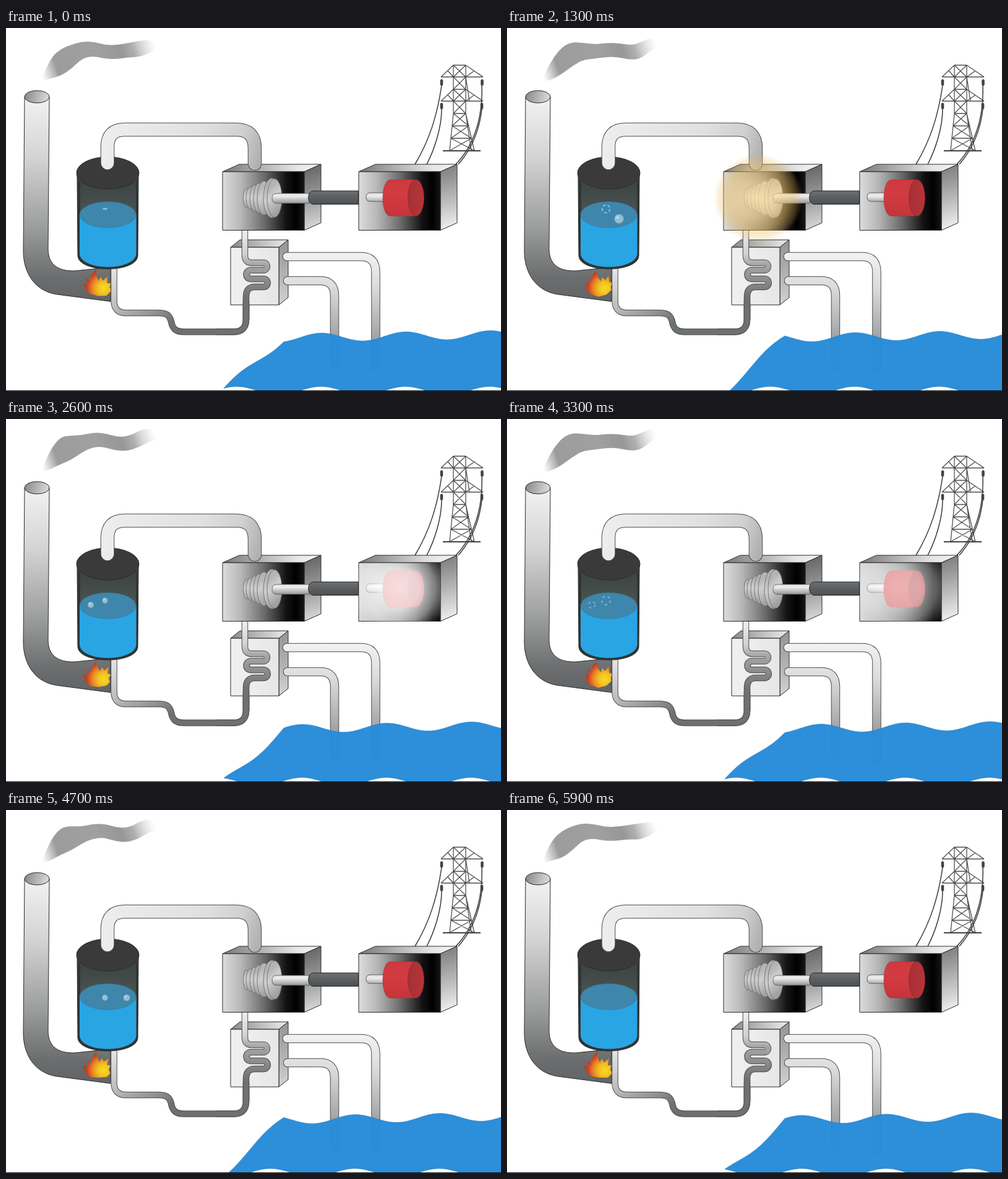
Recreate the animation shown at these times as an HTML page. Size 800x586 px, loop 6 s.

```html
<!DOCTYPE html>
<html lang="en">
<head>
<meta charset="utf-8">
<title>Steam power plant</title>
<style>
html, body { margin: 0; width: 100%; height: 100%; overflow: hidden; background: #fff; }
svg { display: block; width: 800px; height: 586px; }
.edge { stroke: #2b2b2b; stroke-width: 1; stroke-linejoin: round; }
.wire { fill: none; stroke: #3a3a3a; stroke-width: 1.5; }
</style>
</head>
<body>
<svg id="stage" viewBox="0 0 800 586">
  <defs id="defs"></defs>
  <path id="smoke" fill="url(#smokeG)"/>

  <g id="chimney" class="edge">
    <path fill="url(#chimneyG)" d="M30 111 L28 360 C28 397 48 425 82 430 L169 441.500 V386 L112 392 C84 393 68 382 68 356 L70 111 Z"/>
    <ellipse cx="50" cy="111" rx="20" ry="10" fill="url(#rimG)"/>
  </g>
  <path id="flame" fill="url(#flameG)"/>

  <g id="pylon" class="wire"></g>
  <g class="wire">
    <path d="M704 93 C697 140 685 180 661 220"/>
    <path d="M704 131 C704 160 693 195 680 220"/>
    <path d="M769 93 C771 145 756 190 727 220"/>
    <path d="M769 131 C765 165 752 196 731 220"/>
  </g>
  <g fill="#444" stroke="#333" stroke-width=".5">
    <rect x="702" y="83" width="4" height="10" rx="2"/>
    <rect x="767.500" y="83" width="4" height="10" rx="2"/>
    <rect x="702" y="121" width="4" height="10" rx="2"/>
    <rect x="767" y="121" width="4" height="10" rx="2"/>
  </g>

  <g id="feed"></g>

  <g id="boiler">
    <path class="edge" fill="#303534" d="M115 236 L116 368 C118 396 211 396 213 368 L214 236 Z"/>
    <path fill="url(#tankG)" d="M120 240 V303 H210 V240 Z"/>
    <path fill="#29a5e4" d="M119 301 V364 C120 393 209 393 210.500 364 V301 Z"/>
    <ellipse cx="164.500" cy="301.500" rx="45.500" ry="21" fill="#3e86ac" stroke="#397a9c" stroke-width=".7"/>
    <ellipse class="edge" cx="164.500" cy="234" rx="50.500" ry="26" fill="#3a3a3b"/>
    <path fill="#3a3a3b" d="M114.500 234 L116 250 Q120 248 122 244 M214.500 234 L213 250 Q209 248 207 244"/>
  </g>
  <g id="bubbles"></g>

  <g id="boxes" class="edge"></g>
  <g id="pipes"></g>

  <g id="turbine"></g>
  <path fill="url(#rodG)" stroke="#555" stroke-width=".8" d="M490 267 H437 Q430 267 430 275 Q430 283 437 283 H490 Z"/>
  <path fill="url(#darkRodG)" stroke="#222" d="M569.500 263 H497 C486 263 486 284.500 497 284.500 H569.500 Z"/>

  <path fill="url(#rodG)" stroke="#444" stroke-width=".8" d="M613 266 H589 Q582 266 582 273 Q582 280 589 280 H613 Z"/>
  <path fill="url(#redG)" stroke="#a92e33" stroke-width=".6" d="M621 245 H663 V303.500 H621 C605 303 605 246 621 245 Z"/>
  <ellipse cx="662.500" cy="274.200" rx="13" ry="29.300" fill="url(#redEndG)" stroke="#8e292e" stroke-width=".7"/>

  <circle id="warm" cx="406" cy="275" r="72" fill="url(#warmG)"/>
  <path id="white" fill="url(#whiteG)" d="M570 232.500 H702 V326.500 H570 Z"/>

  <path id="lake" fill="#288cd9" fill-opacity=".975" stroke="#2b80c0" stroke-width=".6"/>
  <rect y="585" width="800" height="1" fill="#111"/>
</svg>
<script>
const NS = 'http://www.w3.org/2000/svg';
const $ = id => document.getElementById(id);

function add(parent, tag, attrs) {
  const el = document.createElementNS(NS, tag);
  for (const k in attrs) el.setAttribute(k, attrs[k]);
  parent.appendChild(el);
  return el;
}

// Each stop reads "offset colour [opacity]".
function gradient(id, pos, stops) {
  const radial = pos.length === 3;
  const keys = radial ? ['cx', 'cy', 'r'] : ['x1', 'y1', 'x2', 'y2'];
  const attrs = { id, gradientUnits: 'userSpaceOnUse' };
  keys.forEach((k, i) => attrs[k] = pos[i]);
  const g = add($('defs'), radial ? 'radialGradient' : 'linearGradient', attrs);
  for (const s of stops.split(',')) {
    const [offset, color, opacity = 1] = s.trim().split(' ');
    add(g, 'stop', { offset, 'stop-color': color, 'stop-opacity': opacity });
  }
}

gradient('smokeG', [60, 84, 243, 24], '0 #aaa 0, .14 #9c9c9c, .5 #a0a0a0, .7 #979797, .8 #a0a0a0 .85, .9 #bbb .42, 1 #ddd 0');
gradient('chimneyG', [0, 111, 0, 435], '0 #f2f2f2, .3 #d4d4d4, .65 #9c9d9d, .9 #6b6d6e, 1 #636566');
gradient('rimG', [32, 106, 68, 116], '0 #8c8c8c, .5 #b4b4b4, 1 #dcdcdc');
gradient('flameG', [158, 420, 33], '0 #f6dc24, .3 #f2c022, .55 #ea8a24, .8 #cf4424, 1 #b3301f');
gradient('tankG', [0, 245, 0, 303], '0 #3c4342, 1 #4b5553');
gradient('rodG', [0, 266, 0, 284], '0 #ddd, .3 #eee, 1 #8c8c8c');
gradient('darkRodG', [0, 263, 0, 284], '0 #6c7072, .5 #5b5f61, 1 #4d5153');
gradient('redG', [0, 245, 0, 303], '0 #cf393f, .4 #d23c41, 1 #c6343a');
gradient('redEndG', [650, 0, 676, 0], '0 #a53036, 1 #b8343a');
gradient('steamG', [164, 160, 405, 228], '0 #ededed, .6 #e0e0e0, .85 #d0d0d0, 1 #b0b0b0');
gradient('coolG', [0, 362, 0, 500], '0 #f2f2f2, .4 #dcdcdc, 1 #a2a3a4');
gradient('feedG', [174, 390, 250, 490], '0 #e4e4e4, .4 #bcbcbc, .75 #929394, 1 #6c7071');
gradient('coilG', [0, 327, 0, 435], '0 #eee, .35 #d0d0d0, .5 #a8a8a8, .75 #8b8b8b, 1 #6e7173');
gradient('warmG', [406, 275, 72], '0 #ffe4a4 .75, .4 #fcdb94 .62, .7 #f5c568 .45, .88 #efb95a .25, 1 #efb95a 0');
gradient('whiteG', [637, 273, 80], '0 #fff .83, .4 #fff .77, .7 #fff .5, 1 #fff 0');

// Boxes: front face, then the top and side set back by (dx, dy).
function box(id, x, y, w, h, dx, dy, front, top, side) {
  gradient(id + 'F', [x, y, x + w, y], front);
  gradient(id + 'T', [x, y, x + w + dx, y - dy], top);
  gradient(id + 'S', [x + w, y, x + w + dx, y + h], side);
  const face = (k, d) => add($('boxes'), 'path', { d, fill: `url(#${id + k})` });
  face('T', `M${x} ${y} l${dx} ${-dy} h${w} l${-dx} ${dy} Z`);
  face('S', `M${x + w} ${y} l${dx} ${-dy} v${h} l${-dx} ${dy} Z`);
  face('F', `M${x} ${y} h${w} v${h} h${-w} Z`);
}
const metal = '0 #dcdcdc, .22 #b8b8b8, .5 #6e6e6e, .78 #121212, .9 #000, 1 #161616';
const lid = '0 #777, .4 #b4b4b4, .75 #e6e6e6, 1 #f4f4f4';
box('turb', 350, 232, 132, 94.5, 27, 12, metal, lid, '0 #6c6c6c, .5 #a0a0a0, 1 #e0e0e0');
box('gen', 570, 232, 132, 94.5, 27, 12, metal, lid, '0 #858585, .5 #bcbcbc, 1 #f6f6f6');
box('cond', 363, 354, 78, 93, 15, 12, '0 #f0f0f0, .5 #ececec, 1 #e6e6e6',
  '0 #888, .5 #bbb, 1 #eee', '0 #999, .5 #b4b4b4, 1 #d4d4d4');

function pipe(parent, d, width, fill, cap = 'round') {
  const line = { d, fill: 'none', 'stroke-linecap': cap };
  add(parent, 'path', { ...line, stroke: '#4c4c4c', 'stroke-width': width + 1 });
  add(parent, 'path', { ...line, stroke: fill, 'stroke-width': width - 1 });
}
pipe($('feed'), 'M174.5 386 V440 Q174.5 460 194 460 H246 C262 460 265 466 267 474 C269 486 275 490.500 288 490.500 H368 Q388 490.500 388 470 V440', 9.5, 'url(#feedG)', 'butt');
const pipes = $('pipes');
pipe(pipes, 'M164 218 V192 Q164 164 192 164 H372 Q402 164 402 194 V219', 21.5, 'url(#steamG)');
pipe(pipes, 'M386 327 V367 Q386 379 397 379 H416 C424 379 424 391 416 391 H396 C386 391 386 405 396 405 H416 C425 405 425 418 416 418 H402 Q388 418 388 434 V470', 9.5, 'url(#coilG)', 'butt');
pipe(pipes, 'M388 440 V470 Q388 490.500 368 490.500 H340', 9.5, '#6e7173', 'butt');
pipe(pipes, 'M454 369 H574 Q597.500 369 597.500 394 V548', 13.5, 'url(#coolG)');
pipe(pipes, 'M455 408 H508 Q531 408 531 432 V545', 13.5, 'url(#coolG)');

[[389, 5.5, 16], [395, 7, 18], [402, 8, 21], [409, 9, 24], [417, 11, 27.5], [430, 14, 32], [434, 12, 31]].forEach(([cx, rx, ry], i) => {
  gradient('disc' + i, [cx - rx, 262, cx + rx, 290], '0 #b4b4b4, .35 #cfcfcf, 1 #a0a0a0');
  add($('turbine'), 'ellipse', { cx, cy: 274.5, rx, ry, fill: `url(#disc${i})`, stroke: '#686868', 'stroke-width': 0.8 });
});

function drawPylon() {
  const ys = [60, 79, 99, 118, 138, 158, 178, 198];
  const left = y => y < 138 ? 723 : 723 - (y - 138) * 0.1;
  const right = y => y < 138 ? 743 : 743 + (y - 138) * 0.23;
  let d = '';
  const line = (a, b, c, e) => d += `M${a} ${b}L${c} ${e}`;
  for (let i = 0; i < ys.length - 1; i++) {
    const a = ys[i], b = ys[i + 1];
    line(left(a), a, left(b), b);
    line(right(a), a, right(b), b);
    line(left(a), a, right(b), b);
    line(right(a), a, left(b), b);
    line(left(a), a, right(a), a);
  }
  for (const y of [60, 99]) {
    line(723, y, 703, y + 19);
    line(743, y, 771, y + 19);
    line(703, y + 19, 771, y + 19);
    line(714, y + 9, 723, y + 19);
    line(757, y + 9, 743, y + 19);
  }
  line(743, 79, 749, 118);
  line(743, 138, 752, 198);
  add($('pylon'), 'path', { d, 'stroke-width': 1.3, stroke: '#505050' });
  add($('pylon'), 'path', { d: 'M706 198.300H767', 'stroke-width': 2 });
}
drawPylon();

const TAU = Math.PI * 2;
const clamp = v => Math.max(0, Math.min(1, v));
const pulse = (t, a, b, c, d) => Math.min(clamp((t - a) / (b - a)), clamp((d - t) / (d - c)));
const fix = v => v.toFixed(2);
const polygon = pts => 'M' + pts.map(p => fix(p[0]) + ' ' + fix(p[1])).join('L') + 'Z';

// Closed curve through the midpoints of a polygon.
function smooth(pts) {
  const mid = (a, b) => `${fix((a[0] + b[0]) / 2)} ${fix((a[1] + b[1]) / 2)}`;
  const n = pts.length;
  return 'M' + mid(pts[n - 1], pts[0]) + pts.map((p, i) =>
    `Q${fix(p[0])} ${fix(p[1])} ${mid(p, pts[(i + 1) % n])}`).join('') + 'Z';
}

function lakePath(t) {
  const crest = 645.5 + 40.7 * t;
  const wave = x => -6.8 * Math.cos((x - crest) / 136.5 * TAU);
  const base = x => 500.2 + (x < 449 ? (449 - x) * 0.88 : (449 - x) * 0.0145);
  const top = [], bottom = [];
  for (let x = 352; x <= 804; x += x === 448 ? 1 : 4) {
    top.push([x, base(x) + wave(x)]);
    bottom.unshift([x, 585.6 + wave(x)]);
  }
  return polygon(top.concat(bottom));
}

const smokePts = [[56, 87], [64, 67], [75, 46], [89, 31], [104, 25.5], [122, 24], [142, 23.5], [162, 25], [182, 27], [202, 26], [218, 20], [234, 16],
  [247, 30], [230, 39], [214, 48], [196, 50], [176, 49], [157, 47], [139, 47], [122, 52], [106, 64], [90, 74], [72, 82]];
function smokePath(t) {
  return smooth(smokePts.map(([x, y]) =>
    [x, y - 2.8 * clamp((x - 55) / 30) * Math.cos((x - 130 - 35 * t) / 70 * TAU)]));
}

const flamePts = [[136, 430], [129, 424], [126, 412], [132, 414], [131, 404], [137, 408], [138, 400], [145, 391], [147, 401], [151, 408], [154, 401],
  [158, 407], [165, 400], [164, 411], [170, 412], [167, 418], [169, 424], [162, 431], [149, 433]];
function flamePath(t) {
  return polygon(flamePts.map(([x, y]) =>
    [x + 1.3 * Math.sin(t * TAU + y / 6), y + 1.1 * Math.sin(t * TAU + x / 6)]));
}

// x, y, radius, then times of birth, full size, popping and end
const bubbles = [
  [160, 292, 8, -0.15, 0.7, 1.2, 1.9], [181, 308, 7.5, 0.2, 0.9, 1.5, 2.1],
  [137, 300, 6, 2, 2.75, 3.1, 3.6], [160, 293, 8, 2.1, 3, 3.1, 3.7],
  [160, 303, 8, 4.15, 5.1, 5.2, 5.8], [195, 303, 8, 4.1, 5, 5.1, 5.7]
].map(b => ({
  b,
  ball: add($('bubbles'), 'ellipse', { cx: b[0], cy: b[1], fill: '#b0cfe0', 'fill-opacity': 0.75 }),
  shine: add($('bubbles'), 'circle', { fill: '#dcebf3', 'fill-opacity': 0.6 }),
  ring: add($('bubbles'), 'circle', { cx: b[0], cy: b[1], fill: 'none', stroke: '#b5d4e4', 'stroke-width': 1.5 })
}));

function drawBubbles(t) {
  for (const { b: [x, y, r, start, full, pop, end], ball, shine, ring } of bubbles) {
    const grow = clamp((t - start) / (full - start));
    const burst = clamp((t - pop) / (end - pop));
    const whole = t > start && t < pop;
    ball.setAttribute('rx', whole ? r * Math.max(grow, 0.5) : 0);
    ball.setAttribute('ry', whole ? r * grow : 0);
    shine.setAttribute('cx', x - r * grow * 0.3);
    shine.setAttribute('cy', y - r * grow * 0.3);
    shine.setAttribute('r', whole ? r * grow * 0.3 : 0);
    const on = burst > 0 && burst < 1;
    ring.setAttribute('r', on ? r * (0.75 + burst * 0.3) : 0);
    const dash = 5.5 * (1 - burst);
    ring.setAttribute('stroke-dasharray', `${fix(dash)} ${fix(2 + 9 * burst)}`);
    ring.setAttribute('opacity', 1 - burst * 0.6);
  }
}

function draw(t) {
  $('lake').setAttribute('d', lakePath(t));
  $('smoke').setAttribute('d', smokePath(t));
  $('flame').setAttribute('d', flamePath(t));
  $('warm').setAttribute('opacity', pulse(t, 0, 0.9, 1.6, 2.5));
  $('white').setAttribute('opacity', pulse(t, 1.3, 2.4, 3, 4.1));
  drawBubbles(t);
}

function tick(now) {
  draw(Math.floor(now % 6000 / 100) / 10);
  requestAnimationFrame(tick);
}
draw(0);
requestAnimationFrame(tick);
</script>
</body>
</html>
```
